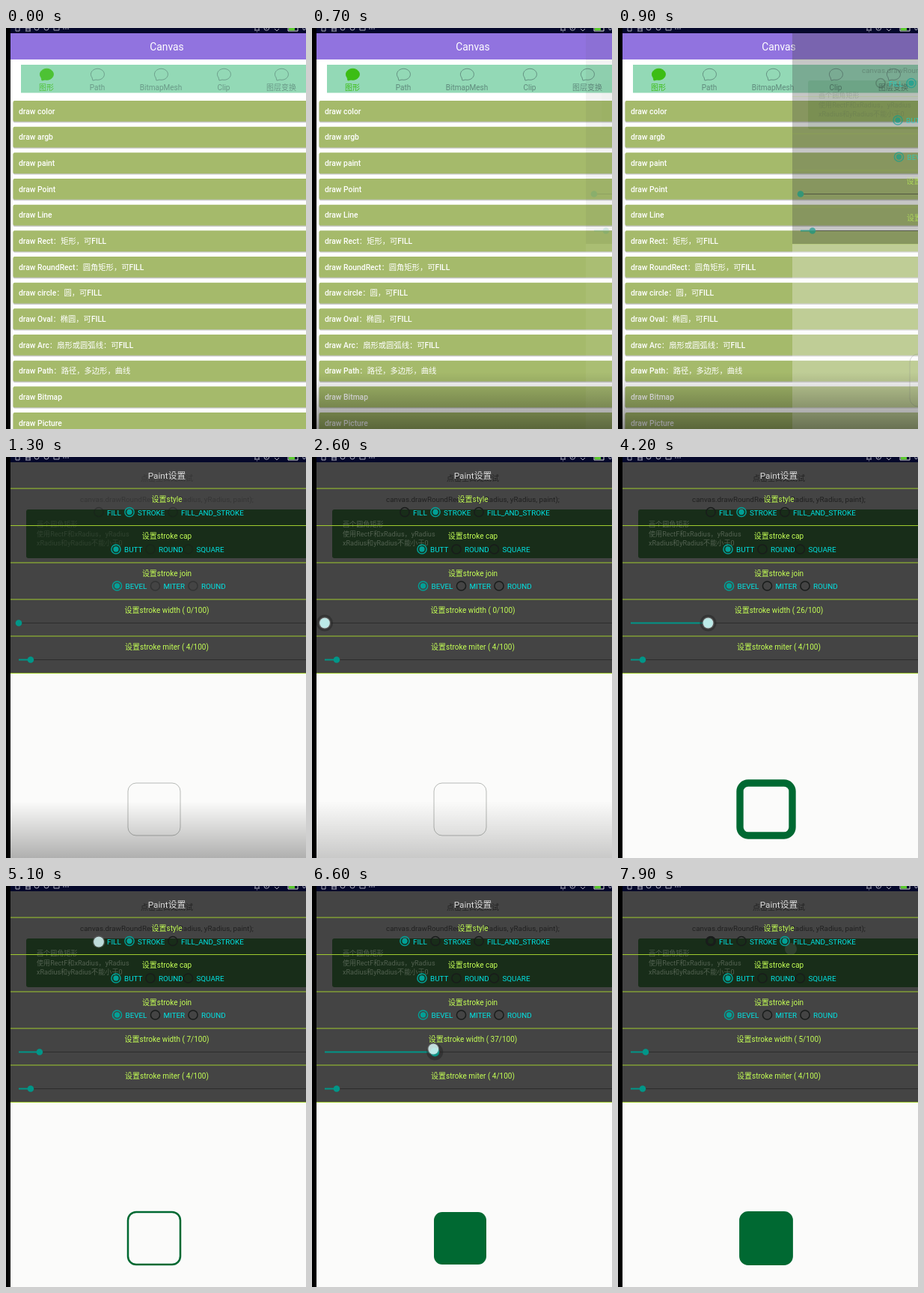
These frames come from a looping animation (401x535 px, 8 s). An HTML page:

```html
<!DOCTYPE html>
<html lang="zh-CN">
<head>
<meta charset="utf-8">
<title>Canvas</title>
<style>
html, body { margin: 0; width: 100%; height: 100%; overflow: hidden; background: #fff; }
svg { display: block; width: 100%; height: 100%; }
text { font-family: Roboto, "Noto Sans CJK SC", "Noto Sans CJK", "Noto Sans", sans-serif; white-space: pre; }
</style>
</head>
<body>
<svg id="stage" viewBox="0 0 401 535"></svg>
<script>
const LOOP = 8000;
const TEAL = '#00a096';
const stage = document.getElementById('stage');

// Linear interpolation through [time, value] points.
function track(t, points) {
  if (t <= points[0][0]) return points[0][1];
  for (let i = 1; i < points.length; i++) {
    const [t0, a] = points[i - 1], [t1, b] = points[i];
    if (t <= t1) return a + (b - a) * (t - t0) / (t1 - t0);
  }
  return points[points.length - 1][1];
}

const rect = (x, y, w, h, fill, extra = '') =>
  `<rect x="${x}" y="${y}" width="${w}" height="${h}" fill="${fill}" ${extra}/>`;
const circle = (x, y, r, fill, extra = '') =>
  `<circle cx="${x}" cy="${y}" r="${r}" fill="${fill}" ${extra}/>`;
const line = (x0, x1, y, color, w = 1) =>
  `<path d="M${x0} ${y}H${x1}" stroke="${color}" stroke-width="${w}"/>`;
// y is the vertical middle of the line of text.
const label = (x, y, s, fill, size = 10, extra = '') =>
  `<text x="${x}" y="${y + size * 0.36}" font-size="${size}" fill="${fill}" ${extra}>${s}</text>`;
const MID = 'text-anchor="middle"';

const rows = ['draw color', 'draw argb', 'draw paint', 'draw Point', 'draw Line',
  'draw Rect：矩形，可FILL', 'draw RoundRect：圆角矩形，可FILL', 'draw circle：圆，可FILL',
  'draw Oval：椭圆，可FILL', 'draw Arc：扇形或圆弧线：可FILL',
  'draw Path：路径，多边形，曲线', 'draw Bitmap', 'draw Picture'];
const tabs = [[54, '图形'], [122, 'Path'], [207, 'BitmapMesh'], [291, 'Clip'], [368, '图层变换']];

function tab([x, name], i) {
  const on = i === 0, color = on ? '#3cbd14' : '#5f8a7c';
  return `<path d="M${x - 6} 70l-1-4a9 7.5 0 1 1 5 3z" fill="${on ? color : 'none'}"
    stroke="${color}" stroke-width=".9"/>` + label(x, 79, name, color, 10, MID);
}

function row(name, i) {
  const y = 97 + i * 34.67;
  return rect(9.5, y + 1.2, 400, 28, '#000', 'rx="2" opacity=".22"') +
    rect(9.5, y, 400, 27.8, '#a5ba6b', 'rx="2"') +
    label(17, y + 14, name, '#fff', 10.3, 'font-weight="500"');
}

const listPage = rect(6, 7, 395, 35, '#9173df') + label(215, 25.5, 'Canvas', '#fff', 13.8, MID) +
  rect(20, 49, 381, 37.5, '#93d9b6') + `<g id="tabs">${tabs.map(tab).join('')}</g>` +
  rows.map(row).join('');

const statusBar = rect(0, 0, 6, 535, '#000') + rect(6, 0, 395, 7, '#05082b') +
  `<g fill="none" stroke="#aab" stroke-width="1">
    <path d="M13 0v4h5v-4M26 1h7M26 4h7M27 0v4M32 0v4M64 0v3h7v-3M332 3h7M333 3v-3M338 3v-3M335 5h1"/>
    <path d="M38 0a3 3 0 0 0 6 0M51 0a3 3 0 0 0 6 0M345 0a3.3 3.3 0 0 0 6.6 0M348 0v1.5M359 1l3 3 3-3"/>
    <path d="M377 0v4h13v-4" stroke="#ddd"/></g>` +
  rect(378, 0, 8, 3.4, '#5ccb2f') +
  [77, 80, 83].map(x => circle(x, 1, .8, '#bbc')).join('') +
  label(396, 0, '0', '#ccd', 9);

const behind = label(215, 28, '点击空白处测试', '#222', 10, MID) +
  label(215, 56, 'canvas.drawRoundRect(rect, xRadius, yRadius, paint);', '#202020', 9.8, MID) +
  ['画个圆角矩形', '使用RectF和xRadius，yRadius', 'xRadius和yRadius不能小于0']
    .map((s, i) => label(41, 90 + i * 12.6, s, '#526150', 9.1)).join('');

const base = rect(6, 7, 395, 528, '#fbfbfa') + rect(6, 7, 395, 281, '#444') +
  rect(27, 70, 380, 65, '#182d19', 'rx="3"');

const dividers = [42, 91.5, 141, 190, 239, 288.5].map(y => line(6, 401, y, '#9fca2e')).join('');
const heading = (y, s) => label(215, y, s, '#c4ff55', 10, MID);

const groups = [
  { y: 73.5, items: [[124, 'FILL'], [165, 'STROKE'], [223, 'FILL_AND_STROKE']] },
  { y: 123, items: [[147, 'BUTT'], [193, 'ROUND'], [243.5, 'SQUARE']] },
  { y: 172, items: [[148.5, 'BEVEL'], [199.5, 'MITER'], [250, 'ROUND']] }
];

function radios({ y, items }, picked, dim) {
  return items.map(([x, name], i) => {
    const on = i === picked;
    return circle(x, y, 6.1, 'none',
      `stroke="${on ? TEAL : '#191c1b'}" stroke-width="1.5" opacity="${on ? 1 : dim}"`) +
      (on ? circle(x, y, 3.7, TEAL) : '') + label(x + 11, y + .5, name, '#00e4e4', 9.85);
  }).join('');
}

const knobX = v => 17 + v * 3.98;

function slider(y, v, held) {
  const x = knobX(v);
  return line(17, 401, y, '#2c2c2c') + line(17, x, y, '#009688', 2) +
    (held ? circle(x, y, 11, '#222', 'opacity=".45"') + circle(x, y, 6, '#009688') : circle(x, y, 4.3, '#009688'));
}

const touch = (x, y) => circle(x, y, 8.3, '#999', 'opacity=".35"') + circle(x, y, 6.9, '#dff', 'opacity=".8"');

function roundRect(style, v) {
  const fill = style === 1 ? 'none' : '#006932';
  const width = style === 0 ? 0 : Math.max(v * .36, .6);
  const stroke = v < .5 ? '#8a8f8a' : '#006932';
  return rect(163, 435, 70, 70, fill, `rx="11" stroke="${stroke}" stroke-width="${width}"`);
}

function paintPage(t) {
  const shift = track(t, [[600, 395], [700, 360], [800, 300], [900, 227], [1000, 105], [1100, 18], [1200, 18], [1300, 0]]);
  const cover = track(t, [[600, 0], [700, .06], [800, .17], [900, .3], [1000, .62], [1100, .93], [1300, 1]]);
  const ink = Math.min(1, cover * 2);
  const clear = t < 2200 ? .4 : 1;
  const v = Math.round(track(t, [[2600, 0], [3400, 25], [3800, 55], [4200, 26], [4900, 7],
    [5800, 7], [6600, 37], [7400, 5]]));
  const style = t < 5200 ? 1 : t < 7800 ? 0 : 2;
  const held = (t >= 2500 && t < 4900) || (t >= 5800 && t < 7400);

  let s = `<g transform="translate(${shift})"><g opacity="${cover}">${base}</g><g opacity="${ink}">` +
    `<g opacity="${clear}">${behind}</g>` + `<g opacity="${cover}">${dividers}</g>` +
    label(215, 25, 'Paint设置', '#dcdcdc', 11.8, MID) +
    heading(56, '设置style') + heading(105.5, '设置stroke cap') + heading(155, '设置stroke join') +
    heading(204, `设置stroke width ( ${v}/100)`) + heading(253.5, '设置stroke miter ( 4/100)') +
    radios(groups[0], style, clear) + radios(groups[1], 0, clear) + radios(groups[2], 0, clear) +
    slider(221.5, v, held) + slider(270.5, 4, false) + roundRect(style, v);

  if (held) s += touch(knobX(v) - (t > 5700 ? 2 : 0), t > 5700 ? 217.5 : 221.5);
  if (t === 5100) s += touch(124, 74.5);
  if (t === 5200 || t === 5300) s += circle(124, 73.5, t === 5200 ? 14 : 21, '#888', `opacity="${t === 5200 ? .25 : .12}"`);
  if (t === 7700) s += touch(231, 84);
  if (t === 7800) s += circle(231, 84, 8, '#999', 'opacity=".45"');
  if (t === 7900) s += circle(231, 84, 8, '#888', 'opacity=".2"') +
    circle(124, 73.5, 5.2, 'none', 'stroke="#191c1b" stroke-width="2.8"');
  return s + '</g></g>';
}

stage.innerHTML = `<defs><linearGradient id="shade" x2="0" y2="1">
  <stop stop-opacity="0"/><stop offset="1"/></linearGradient></defs>` +
  rect(0, 0, 401, 535, '#fff') + listPage + '<g id="paint"></g>' +
  rect(6, 459, 395, 76, 'url(#shade)', 'id="foot"') + statusBar;

const paint = document.getElementById('paint');
const foot = document.getElementById('foot');
const tabBar = document.getElementById('tabs');

function draw(time) {
  const t = Math.floor(time % LOOP / 100) * 100;
  paint.innerHTML = t < 700 ? '' : paintPage(t);
  tabBar.setAttribute('opacity', t < 700 ? .8 : 1);
  foot.setAttribute('opacity', track(t, [[100, 0], [400, .45], [1100, .45], [1300, .3], [2500, .3], [2800, 0]]));
}

const start = performance.now();
function tick() {
  draw(performance.now() - start);
  requestAnimationFrame(tick);
}
tick();
</script>
</body>
</html>
```
